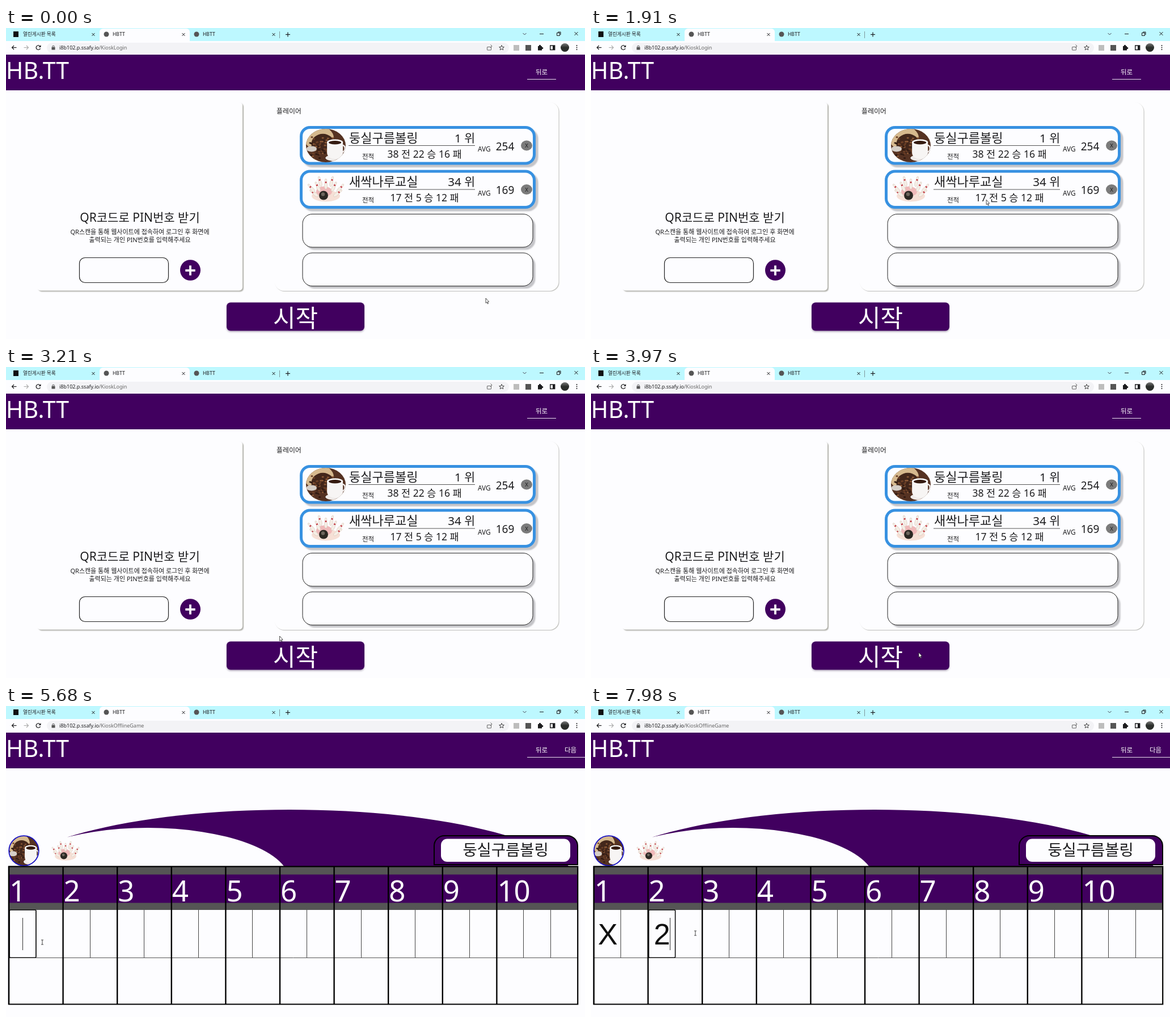
An HTML page with a canvas for the animation above (8 s loop, 1021 px wide and 549 px high).

```html
<!DOCTYPE html>
<html lang="ko">
<head>
<meta charset="utf-8">
<title>Bowling kiosk</title>
<style>
html, body { margin: 0; width: 100%; height: 100%; overflow: hidden; background: #fdfdff; }
canvas { display: block; width: 1021px; height: 549px; }
</style>
</head>
<body>
<canvas id="stage" width="1021" height="549"></canvas>
<script>
const ctx = document.getElementById('stage').getContext('2d');
const LOOP = 8000;
const GAME_START = 4470;
const FOCUS_1 = 5450, TYPE_1 = 6100, FOCUS_2 = 6850, TYPE_2 = 7600;
const PAPER = '#fdfdff', PURPLE = '#41005f', INK = '#1c1c1e', BLUE = '#3791e1';
const SANS = '"Noto Sans", "Noto Sans CJK KR", "Noto Sans CJK", sans-serif';
const ARIAL = '"Liberation Sans", Arial, sans-serif';
const BRAND = 'HB.TT', TAB = 'HBTT';
const PLAYERS = [
  { name: '둥실구름볼링', rank: '1 위', record: '38 전 22 승 16 패', avg: '254' },
  { name: '새싹나루교실', rank: '34 위', record: '17 전 5 승 12 패', avg: '169' }
];

const frameX = i => 5 + 95.6 * i;
const cellX = i => frameX(i) + 24.5;

const REST = { x: 846, y: 477 };
const MOVES = [
  { from: 40, to: 740, x: 779, y: 494 },
  { from: 1500, to: 1570, x: 808, y: 320 },
  { from: 1710, to: 2510, x: 58, y: 207 },
  { from: 2540, to: 3340, x: 511, y: 493 },
  { from: 3540, to: 3970, x: 578, y: 504 },
  { from: 4770, to: 5450, x: cellX(0), y: 404 },
  { from: 5480, to: 5660, x: 64, y: 417 },
  { from: 6410, to: 7300, x: 184, y: 401 }
];

function text(s, x, y, size, o = {}) {
  ctx.font = `${o.weight || 400} ${size}px ${o.font || SANS}`;
  ctx.textAlign = o.align || 'left';
  ctx.fillStyle = o.color || INK;
  ctx.fillText(s, x, y);
  return ctx.measureText(s).width;
}

function rect(x, y, w, h, color) {
  ctx.fillStyle = color;
  ctx.fillRect(x, y, w, h);
}

function paint(fill, stroke, width = 1) {
  if (fill) { ctx.fillStyle = fill; ctx.fill(); }
  if (stroke) { ctx.strokeStyle = stroke; ctx.lineWidth = width; ctx.stroke(); }
}

function line(color, width, ...pts) {
  ctx.beginPath();
  for (let i = 0; i < pts.length; i += 2) ctx.lineTo(pts[i], pts[i + 1]);
  paint(null, color, width);
}

function round(x, y, w, h, r, fill, stroke, width) {
  ctx.beginPath();
  ctx.roundRect(x, y, w, h, r);
  paint(fill, stroke, width);
}

function oval(x, y, rx, ry, fill, stroke, width) {
  ctx.beginPath();
  ctx.ellipse(x, y, rx, ry, 0, 0, 7);
  paint(fill, stroke, width);
}

function poly(pts, fill, stroke, width) {
  ctx.beginPath();
  for (let i = 0; i < pts.length; i += 2) ctx.lineTo(pts[i], pts[i + 1]);
  ctx.closePath();
  paint(fill, stroke, width);
}

function shadowed(dx, dy, blur, color, draw) {
  ctx.save();
  ctx.shadowOffsetX = dx;
  ctx.shadowOffsetY = dy;
  ctx.shadowBlur = blur;
  ctx.shadowColor = color;
  draw();
  ctx.restore();
}

function cross(x, y, r, color, width) {
  line(color, width, x - r, y - r, x + r, y + r);
  line(color, width, x - r, y + r, x + r, y - r);
}

function plus(x, y, r, color, width) {
  line(color, width, x - r, y, x + r, y);
  line(color, width, x, y - r, x, y + r);
}

function chevron(x, y, dx, dy, color, width) {
  line(color, width, x - dx - dy, y - dy - dx, x, y, x - dx + dy, y - dy + dx);
}

function tabs() {
  rect(0, 0, 1021, 23, '#bdf8ff');
  rect(0, 23, 1021, 24, '#fdfdff');
  round(165, 1, 159, 26, [6, 6, 0, 0], '#fdfdff');
  rect(13, 6, 9, 10, '#111');
  text('열린게시판 목록', 30, 14, 8.6);
  for (const x of [177, 336]) {
    oval(x, 11, 4.5, 4.5, '#555');
    text(TAB, x + 11, 14, 8.6);
  }
  for (let i = 0; i < 3; i++) cross(154 + 159 * i, 11.5, 2.5, INK, 1);
  line('#7d979c', 1, 482.5, 6, 482.5, 18);
  plus(497, 11.5, 4, INK, 1.2);

  chevron(914.5, 12, 0, 3, '#445', 1);
  line(INK, 1, 941, 10.5, 948, 10.5);
  round(971.5, 8.5, 5, 5, 0, null, INK);
  line(INK, 1, 973, 7, 978, 7, 978, 12);
  cross(1005.5, 10, 3, INK, 1);
}

function toolbar(path) {
  line(INK, 1.2, 18.5, 34.5, 10.5, 34.5);
  chevron(10.5, 34.5, -3.5, 0, INK, 1.2);
  line('#aaa', 1.1, 31.5, 34.5, 39.5, 34.5);
  chevron(39.5, 34.5, 3.5, 0, '#aaa', 1.1);
  ctx.beginPath();
  ctx.arc(57, 34.5, 3.8, 0.4, 5.5);
  paint(null, INK, 1.3);
  poly([61.5, 30, 61.5, 34, 57.5, 34], INK);

  round(72, 26, 815, 18, 9, '#f3f3f6');
  round(80.5, 33.5, 6, 5, 0.5, '#555');
  ctx.beginPath();
  ctx.arc(83.5, 33, 1.8, Math.PI, 0);
  paint(null, '#555');
  const w = text('i8b102.p.ssafy.io', 94, 38, 9);
  text('/' + path, 94 + w, 38, 9, { color: '#666' });

  round(848.5, 33.5, 7, 5.5, 0.5, null, '#666');
  chevron(857, 32, 2.5, 0, '#555', 1);
  const star = [];
  for (let i = 0; i < 10; i++) {
    const a = i * Math.PI / 5 - Math.PI / 2, r = i % 2 ? 2 : 4.6;
    star.push(874 + r * Math.cos(a), 35 + r * Math.sin(a));
  }
  poly(star, null, '#444');
  rect(895, 30, 10, 10, '#bdbdbd');
  rect(916, 30, 10, 10, '#555');
  rect(938, 32, 7, 7.5, INK);
  oval(941.5, 31.5, 1.8, 1.8, INK);
  oval(945.5, 35.5, 1.8, 1.8, INK);
  round(959.7, 31, 8, 7.5, 0, null, INK, 1.4);
  rect(964, 31, 4, 7.5, INK);
  const g = ctx.createLinearGradient(0, 27, 0, 42);
  g.addColorStop(0, '#777');
  g.addColorStop(0.5, '#2b2e2b');
  oval(985.5, 34.5, 7.5, 7.5, g);
  for (let i = -1; i < 2; i++) oval(1006.5, 34.5 + 3.5 * i, 1, 1, INK);
}

function header(items) {
  rect(0, 47, 1021, 63, PURPLE);
  text(BRAND, 0, 90, 41, { color: '#fff' });
  items.forEach((s, i) => text(s, 944.5 + 51 * i, 82, 11.5, { color: '#fff', align: 'center' }));
  rect(919, 90, 51 * items.length, 1, '#e8e0ee');
}

function random(seed) {
  return () => (seed = seed * 16807 % 2147483647) / 2147483647;
}

// Coffee beans in a sack, a scoop and a cup, inside an oval
function coffee(cx, cy, rx, ry) {
  const rnd = random(7);
  ctx.save();
  ctx.beginPath();
  ctx.ellipse(cx, cy, rx, ry, 0, 0, 7);
  ctx.clip();
  ctx.translate(cx, cy);
  ctx.scale(rx, ry);
  rect(-1, -1, 2, 2, '#553222');
  oval(-0.35, -0.45, 0.75, 0.72, '#d6b98e');
  oval(-0.15, -0.1, 0.58, 0.6, '#43271b');
  for (let i = 0; i < 90; i++) {
    const x = rnd() * 1.3 - 0.8, y = rnd() * 1.4 - 0.5;
    oval(x, y, 0.06, 0.05, ['#2f1a12', '#6d4027', '#8a5836'][i % 3]);
  }
  oval(-0.72, 0.2, 0.26, 0.17, '#d5cec7');
  oval(0.5, 0.74, 0.52, 0.2, '#efebe9');
  oval(0.84, 0.18, 0.13, 0.2, null, '#f2eeec', 0.08);
  round(0.06, -0.2, 0.8, 1, [0, 0, 0.38, 0.38], '#f7f5f4');
  oval(0.46, -0.2, 0.4, 0.17, '#fff');
  oval(0.46, -0.18, 0.32, 0.11, '#351b10');
  ctx.restore();
}

// Pins fanning out from a ball
function pins(cx, cy, k) {
  const count = 9;
  ctx.save();
  ctx.translate(cx, cy);
  ctx.scale(k, k);
  oval(0, 12, 25, 10, '#f6e0d6');
  oval(-3, 4, 14, 9, '#efb9b9');
  for (let i = 0; i < count; i++) {
    const a = (i / (count - 1) - 0.5) * 3;
    const r = 18 + 6 * (i % 2);
    ctx.save();
    ctx.translate(r * 1.2 * Math.sin(a), 8 - r * Math.cos(a));
    ctx.rotate(a * 0.6);
    oval(0, 4, 2.7, 6, '#f5eee6', '#d9c5b8', 0.6);
    oval(0, -5, 1.7, 3.4, '#f5eee6', '#d9c5b8', 0.6);
    rect(-1.6, -3.2, 3.2, 2.4, '#c23a43');
    ctx.restore();
  }
  oval(-4, 11, 8, 8, '#2c2823');
  oval(-5, 9, 3.2, 3.2, '#6d665d');
  ctx.restore();
}

function playerCard(p, i) {
  ctx.save();
  ctx.translate(0, 77.5 * i);
  shadowed(4.5, 4.5, 2, '#c4c4c8', () => round(518, 173, 416, 68.5, 18, BLUE));
  round(523, 178, 406, 58.5, 13, PAPER);
  if (i) pins(564, 207, 1);
  else coffee(564, 207.5, 35, 29.5);
  text(p.name, 605, 201.5, 22, { weight: 350 });
  text(p.rank, 827, 201.5, 20.5, { weight: 350, align: 'right' });
  line('#555', 1, 604, 207.5, 827, 207.5);
  text('전적', 638.5, 230.5, 11.5, { align: 'center' });
  text(p.record, 738, 228.5, 17.5, { weight: 350, align: 'center' });
  text('AVG', 832, 218, 11.8);
  text(p.avg, 880, 215.5, 19, { align: 'center' });
  oval(918, 207.5, 10, 9, '#7b7b7b');
  text('X', 918, 211, 9.5, { align: 'center' });
  ctx.restore();
}

function loginPage() {
  header(['뒤로']);
  shadowed(2, 2, 1.5, '#b4b4ae', () => round(55, 131, 362, 332.5, 6, PAPER));
  shadowed(1, 1, 1, '#bcbcb8', () => round(474, 131, 500.5, 333, 16, PAPER));

  const centered = { align: 'center', weight: 350 };
  text('QR코드로 PIN번호 받기', 236, 342, 21, centered);
  text('QR스캔을 통해 웹사이트에 접속하여 로그인 후 화면에', 236, 363.5, 11, centered);
  text('출력되는 개인 PIN번호를 입력해주세요', 236, 377.5, 11, centered);
  round(129.5, 405.5, 157, 44, 10, PAPER, '#222', 1.2);
  oval(325, 427.5, 18, 18.3, PURPLE);
  plus(325, 428, 8.7, '#fff', 3.8);

  text('플레이어', 477, 150.5, 11.9, { weight: 350 });
  PLAYERS.forEach(playerCard);
  for (let i = 0; i < 2; i++) {
    const y = 328.5 + 68.5 * i;
    shadowed(4.5, 4.5, 2, '#c4c4c8', () => round(523, y, 406, 58.5, 17, PAPER));
    round(523, y, 406, 58.5, 17, null, '#222');
  }
  shadowed(0, 2, 3, '#b8b0c0', () => round(389, 484.5, 243, 50, 7, PURPLE));
  text('시작', 510.5, 527.5, 43, { weight: 300, align: 'center', color: '#fff' });
}

function gamePage(t) {
  header(['뒤로', '다음']);

  ctx.save();
  ctx.beginPath();
  ctx.rect(109, 170, 900, 113);
  ctx.clip();
  oval(500, 318, 510, 135, PURPLE);
  oval(250, 309, 250, 94, PAPER);
  ctx.restore();

  coffee(31.5, 255.5, 26.5, 26.5);
  oval(31.5, 255.5, 26.3, 26.3, null, '#1712c4', 1.8);
  pins(105, 256, 0.76);

  round(755, 229, 253, 51, [18, 18, 0, 0], PURPLE, '#000', 2);
  round(767, 234.5, 228, 40.5, 11, PAPER);
  text(PLAYERS[0].name, 881, 264, 27.4, { weight: 350, align: 'center' });

  rect(5, 283, 1003, 244, PAPER);
  rect(5, 283, 1003, 77, '#555');
  rect(5, 297.5, 1003, 50, PURPLE);
  line('#555', 1, 5, 444.5, 1008, 444.5);
  for (let i = 0; i < 10; i++) {
    const x = frameX(i), mid = Math.floor(x + 47.5) + 0.5;
    text(String(i + 1), x + 1, 345, 51, { color: '#fff' });
    line('#444', 1, mid, 360, mid, 444);
    line('#000', 2.4, x, 283, x, 527);
  }
  line('#444', 1, 960.5, 360, 960.5, 444);
  round(5, 283.3, 1003.2, 243.2, 0, null, '#000', 2.2);

  scoreCell(0, 'X', t, FOCUS_1, TYPE_1, FOCUS_2);
  scoreCell(1, '2', t, FOCUS_2, TYPE_2, LOOP);
}

function scoreCell(i, mark, t, focus, typed, blur) {
  if (t < focus) return;
  const x = cellX(i);
  const value = t < typed ? '' : mark;
  const w = text(value, x, 420.5, 52, { font: ARIAL, align: 'center', color: '#111' });
  if (t >= blur) return;
  round(x - 23.3, 360, 46.8, 84.3, 2, null, '#111', 1.6);
  const age = t - (t < typed ? focus : typed);
  if (age % 1000 < 500) rect(Math.round(x + w / 2 - 0.5), 374, 1, 57, '#333');
}

function pointerAt(t) {
  let { x, y } = REST;
  for (const m of MOVES) {
    const p = Math.min(1, Math.max(0, (t - m.from) / (m.to - m.from)));
    const k = (1 - Math.cos(Math.PI * p)) / 2;
    x += (m.x - x) * k;
    y += (m.y - y) * k;
  }
  return { x, y };
}

function pointer(t) {
  const { x, y } = pointerAt(t);
  ctx.save();
  ctx.translate(x, y);
  if (t >= GAME_START && y > 360 && y < 444) {
    line('#444', 1, 0, -4, 0, 4);
    for (const end of [-4, 4]) line('#444', 1, -2, end, 2, end);
  } else {
    poly([0, 0, 0, 8.5, 1.9, 6.9, 3.3, 10, 4.5, 9.4, 3.2, 6.4, 5.6, 6.2], '#fff', '#222', 0.8);
  }
  ctx.restore();
}

function frame(now) {
  const t = now % LOOP;
  const game = t >= GAME_START;
  rect(0, 0, 1021, 549, PAPER);
  tabs();
  toolbar(game ? 'KioskOfflineGame' : 'KioskLogin');
  if (game) gamePage(t);
  else loginPage();
  pointer(t);
  requestAnimationFrame(frame);
}
requestAnimationFrame(frame);
</script>
</body>
</html>
```
